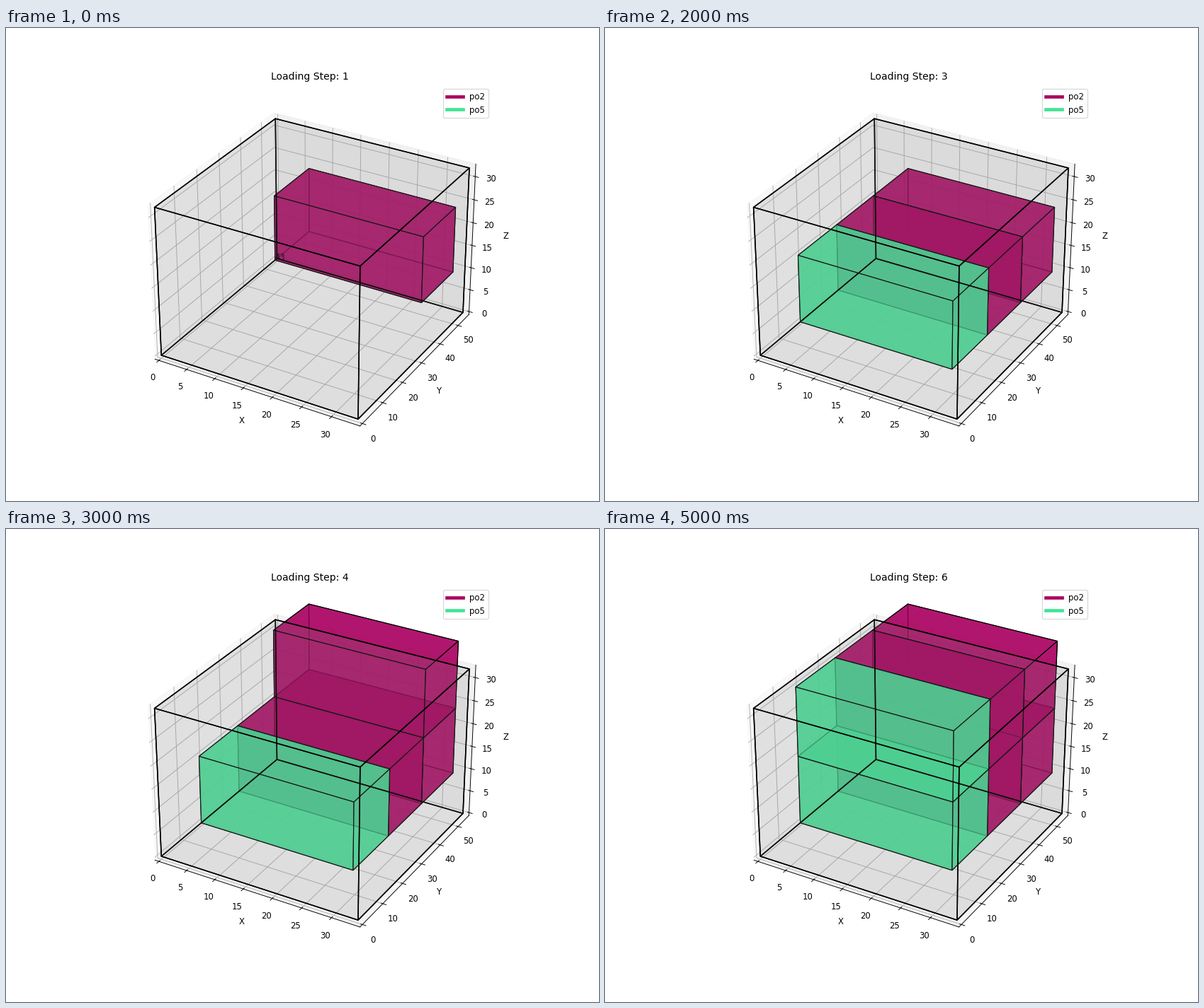
Animation, 837 px wide and 669 px high, one loop 6000 ms. Source, as a matplotlib script:

```python
import matplotlib.pyplot as plt
from matplotlib.animation import FuncAnimation
from matplotlib.lines import Line2D
from mpl_toolkits.mplot3d.art3d import Poly3DCollection

DPI = 83.7
ROOM = (34, 55, 32)
ITEM = (27, 18, 15)
KINDS = {"po2": (170 / 255, 0, 96 / 255), "po5": (66 / 255, 227 / 255, 150 / 255)}
ROWS = ["po2", "po2", "po5"]  # from the back to the front


def cuboid(pos, size, color, alpha, width):
    """Six translucent faces with solid black edges."""
    (x0, y0, z0), (x1, y1, z1) = pos, [p + s for p, s in zip(pos, size)]
    bottom = [(x0, y0, z0), (x1, y0, z0), (x1, y1, z0), (x0, y1, z0)]
    top = [(x, y, z1) for x, y, _ in bottom]
    faces = [bottom, top]
    for i in range(4):
        j = (i + 1) % 4
        faces.append([bottom[i], bottom[j], top[j], top[i]])
    return Poly3DCollection(faces, facecolors=[(*color, alpha)],
                            edgecolors="black", linewidths=width)


fig = plt.figure(figsize=(837.01 / DPI, 669.01 / DPI), dpi=DPI)
ax = fig.add_subplot(projection="3d")
for set_lim, size in zip((ax.set_xlim, ax.set_ylim, ax.set_zlim), ROOM):
    set_lim(-size / 48, size * 49 / 48)
ax.set_xlabel("X")
ax.set_ylabel("Y")
ax.set_zlabel("Z")
title = ax.set_title("Loading Step: 1")

ax.add_collection3d(cuboid((0, 0, 0), ROOM, (0.5, 0.5, 0.5), 0.1, 1.3))

# Two layers of three rows, each filled from the back.
items = []
for step in range(6):
    layer, row = divmod(step, 3)
    pos = (0, (3 - row) * ITEM[1], layer * ITEM[2])
    box = cuboid(pos, ITEM, KINDS[ROWS[row]], 0.7, 1)
    ax.add_collection3d(box)
    items.append(box)
ax.text(0, 3 * ITEM[1], 0, "43")

ax.legend(handles=[Line2D([], [], color=c, lw=4, label=name)
                   for name, c in KINDS.items()], loc="upper right")


def draw(step):
    title.set_text(f"Loading Step: {step + 1}")
    for i, box in enumerate(items):
        box.set_visible(i <= step)
    return [title, *items]


anim = FuncAnimation(fig, draw, frames=6, init_func=lambda: draw(0),
                     interval=1000, repeat=True, repeat_delay=0, blit=False)
plt.show()
```
